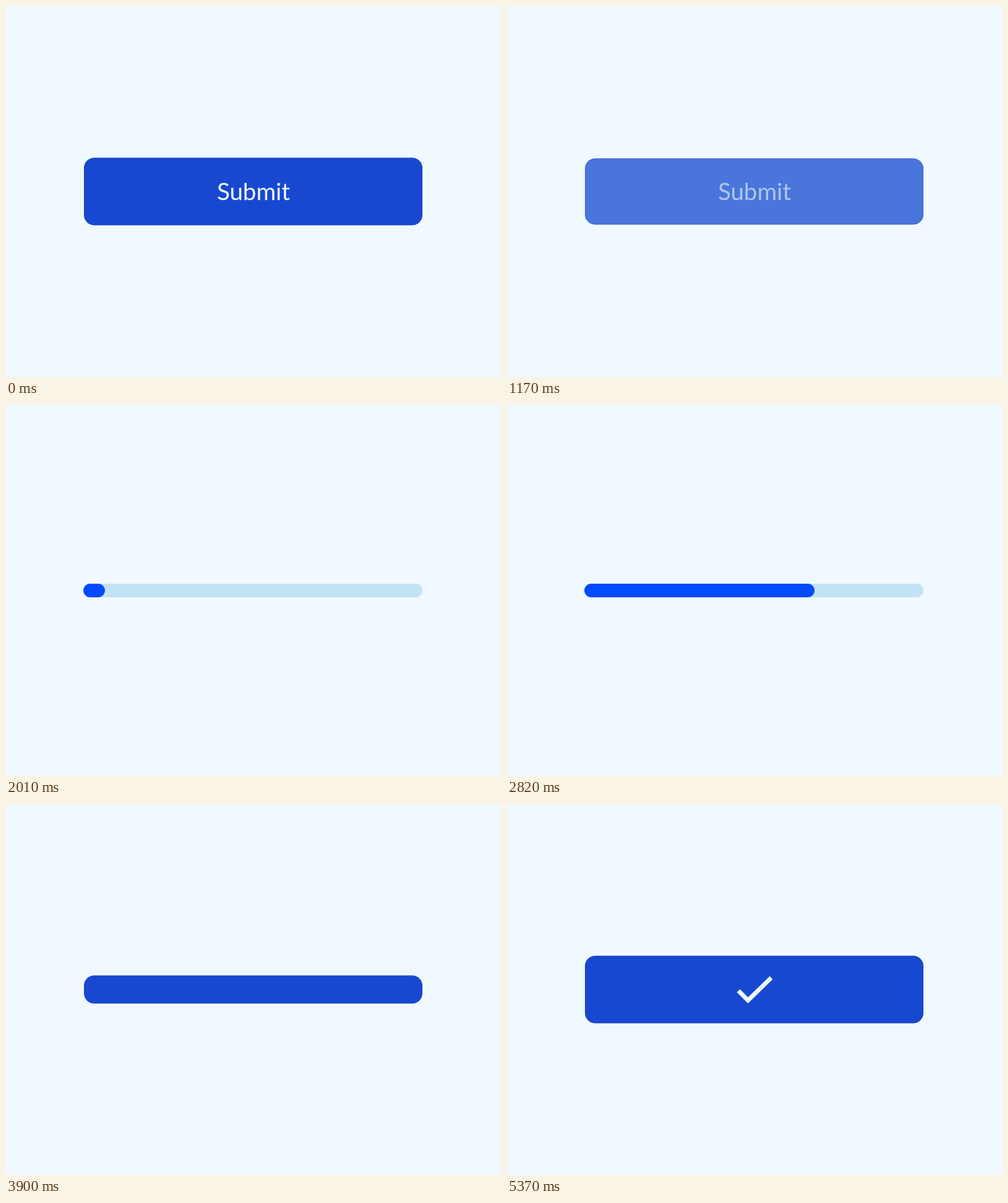
These frames come from a looping animation (800x600 px, 6060 ms). An HTML page:

```html
<!DOCTYPE html>
<html lang="en">
<head>
<meta charset="utf-8">
<title>Submit button</title>
<style>
  html, body { margin: 0; width: 100%; height: 100%; overflow: hidden; background: #f0f9ff; }
  svg { display: block; width: 100vw; height: 100vh; }
  text { font: 38.5px Lato, "Open Sans", sans-serif; fill: #f0f9ff; text-anchor: middle; }
</style>
</head>
<body>
<svg viewBox="0 0 800 600">
  <defs>
    <filter id="outerShadow" x="-30%" y="-30%" width="160%" height="160%">
      <feOffset in="SourceGraphic" dy="2"/>
      <feGaussianBlur stdDeviation="1.3"/>
      <feComposite operator="out" in2="SourceAlpha"/>
    </filter>
    <linearGradient id="rim" x1="0" y1="0" x2="0" y2="1">
      <stop offset="0" stop-color="#fff" stop-opacity=".45"/>
      <stop offset=".5" stop-color="#fff" stop-opacity="0"/>
    </linearGradient>
  </defs>
  <rect width="800" height="600" fill="#f0f9ff"/>
  <rect id="button" x="126" width="547"/>
  <rect id="edge" x="126.5" width="546" fill="none" stroke="#1c3a9c"/>
  <line id="progress" x1="136" y1="300" y2="300" stroke="#004aff" stroke-width="22" stroke-linecap="round"/>
  <text id="label" x="400" y="314">Submit</text>
  <polyline id="check" points="374,302 389.5,317.5 427,281" fill="none" stroke="#f0f9ff" stroke-width="7"/>
  <g id="cursor">
    <circle r="33.5" fill="#0c2470" filter="url(#outerShadow)"/>
    <circle r="33.5" fill="#f0f9ff" fill-opacity=".5"/>
    <circle r="33" fill="none" stroke="url(#rim)"/>
  </g>
</svg>
<script>
const LOOP = 6060;
const BLUE = [24, 72, 208], TRACK = [195, 227, 244], BRIGHT = [0, 74, 255];
const [button, edge, progress, label, check, cursor] =
  ["button", "edge", "progress", "label", "check", "cursor"].map(id => document.getElementById(id));

// Cubic Bezier easing, solved by bisection.
function bezier(x1, y1, x2, y2) {
  const at = (a, b, u) => 3 * a * u * (1 - u) ** 2 + 3 * b * u * u * (1 - u) + u ** 3;
  return x => {
    let lo = 0, hi = 1;
    for (let i = 0; i < 24; i++) {
      const mid = (lo + hi) / 2;
      if (at(x1, x2, mid) < x) lo = mid; else hi = mid;
    }
    return at(y1, y2, (lo + hi) / 2);
  };
}
const linear = x => x;
const inOut = bezier(.42, 0, .58, 1);
const settle = bezier(.42, 0, .3, 1);

const mix = (a, b, k) => a + (b - a) * k;
const mixColor = (a, b, k) => `rgb(${a.map((v, i) => Math.round(mix(v, b[i], k)))})`;

function phase(t, start, end, ease = inOut) {
  const x = (t - start) / (end - start);
  return x <= 0 ? 0 : x >= 1 ? 1 : ease(x);
}

function set(el, attrs) {
  for (const name in attrs) el.setAttribute(name, attrs[name]);
}

function drawButton(t) {
  const collapsed = phase(t, 1110, 1710) - phase(t, 3690, 4275);
  const h = mix(109, 22, collapsed);
  const fill = t < 3660
    ? mixColor(BLUE, TRACK, phase(t, 1110, 1320, linear))
    : mixColor(BRIGHT, BLUE, phase(t, 3650, 3840, linear));
  set(button, { y: 300 - h / 2, height: h, rx: Math.min(16.5, h / 2), fill });
  const edgeOpacity = .5 * (1 - phase(t, 1110, 1250) + phase(t, 3850, 4275));
  set(edge, { y: 300.5 - h / 2, height: h - 1, rx: Math.min(16, (h - 1) / 2), opacity: edgeOpacity });
}

function drawProgress(t) {
  const end = 136 + 350 * phase(t, 1885, 2815) + 176 * phase(t, 2850, 3400, settle);
  set(progress, { x2: end + .01, visibility: t >= 1875 && t < 3660 ? "visible" : "hidden" });
}

function drawCheck(t) {
  const size = 1.05 * phase(t, 4050, 4260) - .05 * phase(t, 4260, 4620, settle);
  set(check, {
    transform: `translate(400 300) scale(${size}) translate(-400 -300)`,
    opacity: phase(t, 4050, 4200, linear)
  });
}

function drawCursor(t) {
  const moved = phase(t, 105, 715);
  const size = 1 - .15 * (phase(t, 800, 930) - phase(t, 930, 1060));
  set(cursor, {
    transform: `translate(${mix(842, 599.3, moved)} ${mix(422, 318, moved)}) scale(${size})`,
    opacity: 1 - phase(t, 980, 1130, linear)
  });
}

function draw(t) {
  drawButton(t);
  drawProgress(t);
  drawCheck(t);
  drawCursor(t);
  set(label, { opacity: 1 - phase(t, 1100, 1280, linear) });
}

const begin = performance.now();
function tick() {
  draw((performance.now() - begin) % LOOP);
  requestAnimationFrame(tick);
}
tick();
</script>
</body>
</html>
```
